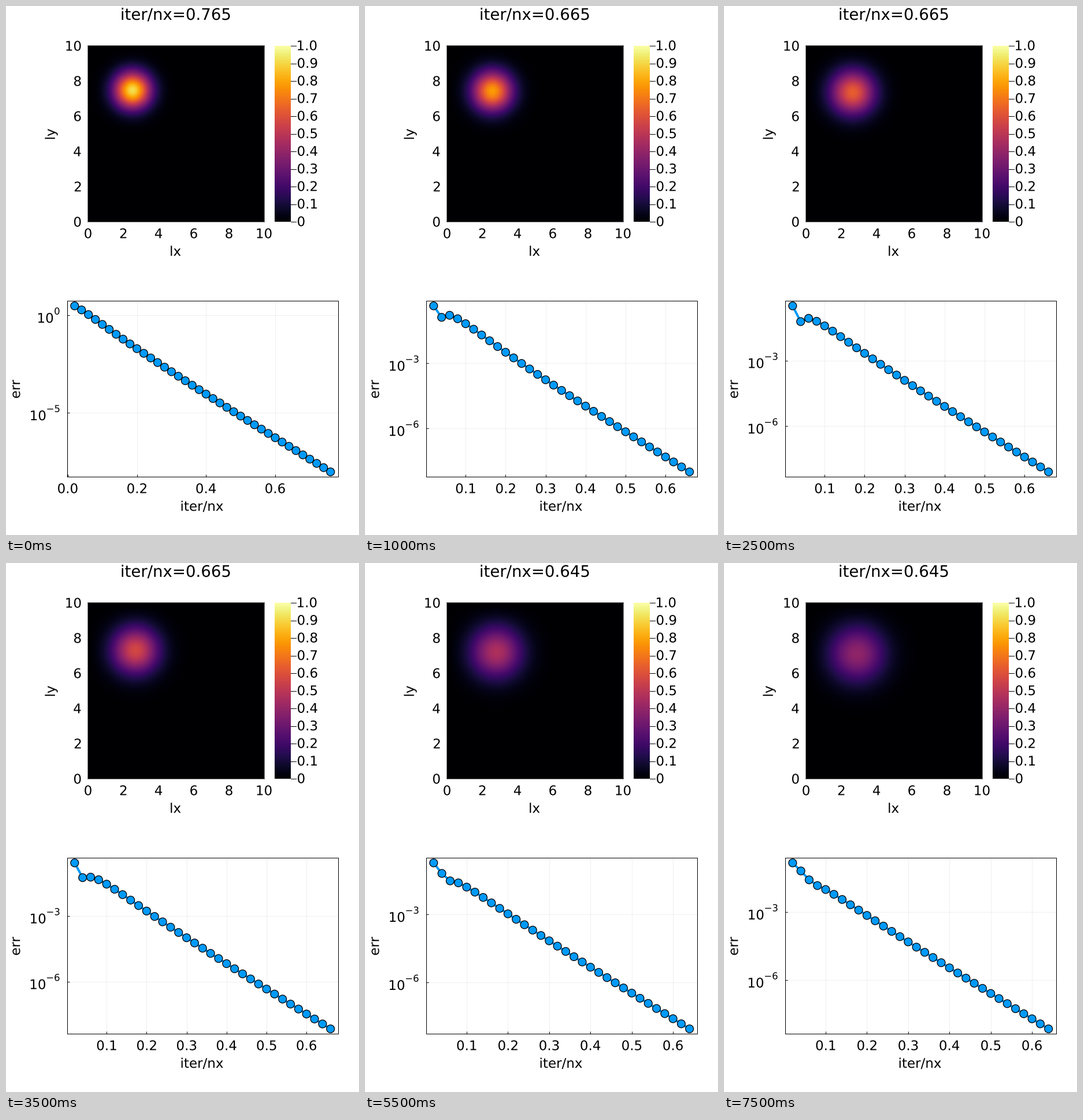
These frames come from a looping animation (611 by 917 pixels, 8 s). A matplotlib script:

```python
import numpy as np
import matplotlib.pyplot as plt
from matplotlib.animation import FuncAnimation
from matplotlib.patches import PathPatch
from matplotlib.textpath import TextPath
from matplotlib.transforms import Affine2D

W, H, DPI = 611, 917, 100
PT = 72 / DPI                     # points per pixel
BODY, TITLE, SUP = 23, 27.6, 16.5  # text sizes in pixels
FRAMES = 16

plt.rcParams["font.family"] = "DejaVu Sans"

# Implicit diffusion by pseudo-transient iterations, then upwind advection
L, NX, NY, NCHECK = 10.0, 200, 201, 4
CHECKS = [38, 34] + [33] * 8 + [32] * 6


def simulate():
    dx, dy = L / NX, L / NY
    dt = min(dx, dy) / 2
    rho = (L / (np.pi + np.sqrt(np.pi ** 2 + 1000))) ** 2
    dtau = min(dx, dy) * np.sqrt(rho / 2)
    a, b = dtau / (rho + dtau), dtau / (1 + dtau / dt)
    x = (np.arange(NX) + 0.5) * dx
    y = (np.arange(NY) + 0.5) * dy
    c = np.exp(-(x[:, None] - L / 4) ** 2 - (y[None, :] - 3 * L / 4) ** 2)
    qx = np.zeros((NX - 1, NY - 2))
    qy = np.zeros((NX - 2, NY - 1))
    mid = (slice(1, -1), slice(1, -1))

    def grads():
        return (np.diff(c[:, 1:-1], axis=0) / dx,
                np.diff(c[1:-1], axis=1) / dy)

    def div(fx, fy):
        return np.diff(fx, axis=0) / dx + np.diff(fy, axis=1) / dy

    steps = []
    for n in CHECKS:
        old = c[mid].copy()
        errs = []
        for it in range(1, n * NCHECK + 1):
            gx, gy = grads()
            qx -= a * (qx + gx)
            qy -= a * (qy + gy)
            c[mid] -= b * ((c[mid] - old) / dt + div(qx, qy))
            if it % NCHECK == 0:
                res = div(*grads()) - (c[mid] - old) / dt
                errs.append(np.log10(np.abs(res).max()))
        c[1:] -= dt / dx * np.diff(c, axis=0)
        c[:, :-1] += dt / dy * np.diff(c, axis=1)
        steps.append((c.T.copy(), np.array(errs)))
    return steps


steps = simulate()

fig = plt.figure(figsize=(W / DPI, H / DPI), dpi=DPI, facecolor="white")


def pixel_axes(x, y, w, h, snap=None):
    ax = fig.add_axes([x / W, 1 - (y + h) / H, w / W, h / H])
    for s in ax.spines.values():
        s.set(linewidth=PT, snap=snap)
    return ax


MAP = (142, 69, 305, 305)
BAR = (465, 69, 28, 305)
ERR = (105.5, 511.2, 469.5, 305)

heat = pixel_axes(*MAP, snap=False)
bar = pixel_axes(*BAR)
plot = pixel_axes(*ERR)
page = pixel_axes(0, 0, W, H)
page.set(xlim=(0, W), ylim=(H, 0))
page.axis("off")


def label(x, y, s, size=BODY, ha="center", ax=page, angle=0):
    """Outline text aligned by its ink at x, with its baseline at y."""
    path = TextPath((0, 0), s, size=size)
    box = path.get_extents()
    anchor = {"left": box.x0, "center": (box.x0 + box.x1) / 2,
              "right": box.x1}[ha]
    place = (Affine2D().translate(-anchor, 0).rotate_deg(angle)
             .scale(1, -1).translate(x, y))
    ax.add_artist(PathPatch(path.transformed(place), fc="black", lw=0,
                            transform=page.transData, clip_on=False))
    return box.width


# Heatmap and colour bar
image = heat.imshow(steps[0][0], cmap="inferno", vmin=0, vmax=1,
                    origin="lower", extent=(0, L, 0, L), aspect="auto",
                    interpolation="nearest")
heat.set(xticks=[], yticks=[])
bar.imshow(np.linspace(0, 1, 256)[:, None], cmap="inferno", origin="lower",
           aspect="auto", interpolation="nearest")
bar.axis("off")

for v in range(0, 11, 2):
    label(142 + 30.5 * v, 402.4, str(v))
    label(129.5, 374 - 30.5 * v + 8.4, str(v), ha="right")
for k in range(11):
    y = 374 - 30.5 * k
    page.plot([493, 502], [y, y], color="black", lw=PT)
    label(505, y + 7.6, f"{k / 10:.1f}" if k else "0", ha="left")

label(293.8, 433, "lx")
label(84.8, 221.7, "ly", angle=90)
label(339.7, 875, "iter/nx")
label(24.2, 663.7, "err", angle=90)


def padded(lo, hi):
    pad = 0.03 * (hi - lo)
    return lo - pad, hi + pad


def power_label(y, e):
    exp = f"{e}".replace("-", "\u2212")
    width = label(92.5, y - 1.2, exp, SUP, "right", plot)
    label(92.5 - width - 3, y + 13, "10", BODY, "right", plot)


def update(i):
    field, errs = steps[i]
    n = len(errs)
    image.set_data(field)

    plot.clear()
    label(294, 24, f"iter/nx={(n * NCHECK + 1) / NX:.3f}", TITLE, ax=plot)
    xs = 0.02 * np.arange(1, n + 1)
    x0, x1 = padded(xs[0], xs[-1])
    y0, y1 = padded(errs[-1], errs.max())
    xt = [0.0, 0.2, 0.4, 0.6] if i == 0 else [k / 10 for k in range(1, 7)]
    yt = [0, -5] if i == 0 else [-3, -6]
    plot.plot(xs, errs, color="#009AFA", lw=4 * PT, zorder=3)
    # One size per dot keeps the dots at sub-pixel positions
    plot.scatter(xs, errs, s=np.full(n, (13.8 * PT) ** 2), c="#009AFA",
                 edgecolors="black", linewidths=1.3 * PT, zorder=4)
    plot.set(xlim=(x0, x1), ylim=(y0, y1), xticks=xt, yticks=yt)
    plot.set_axisbelow(True)
    plot.grid(color="black", alpha=0.06, lw=PT)
    plot.tick_params(direction="in", length=4 * PT, width=PT,
                     labelbottom=False, labelleft=False)
    for v in xt:
        label(ERR[0] + ERR[2] * (v - x0) / (x1 - x0), 844.4, f"{v:.1f}",
              ax=plot)
    for e in yt:
        power_label(ERR[1] + ERR[3] * (y1 - e) / (y1 - y0), e)
    return []


anim = FuncAnimation(fig, update, frames=FRAMES, interval=500, repeat=True,
                     repeat_delay=0, blit=False)
plt.show()
```
